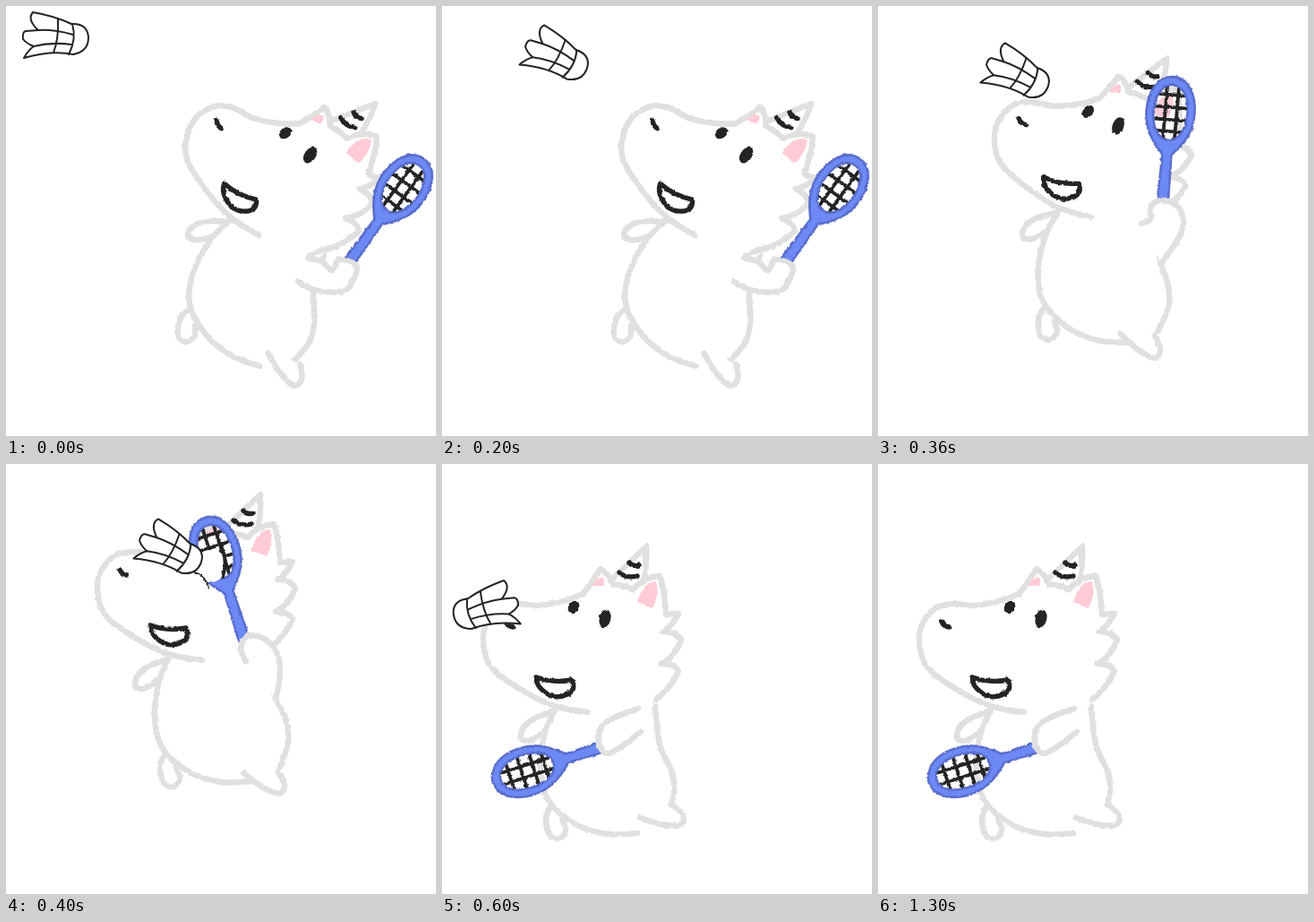
Recreate the animation shown at these times as an HTML page. Size 480 by 480 pixels, loop 1700 ms.

```html
<!DOCTYPE html>
<html lang="en">
<head>
<meta charset="utf-8">
<title>Unicorn badminton</title>
<style>
html, body { margin: 0; width: 100%; height: 100%; overflow: hidden; background: #fff; }
svg { display: block; width: 480px; height: 480px; }
path { stroke-linecap: round; stroke-linejoin: round; }
.soft { fill: #fff; stroke: #e0e0e0; stroke-width: 6.4; }
.line { fill: none; stroke: #e0e0e0; stroke-width: 6.4; }
.ink { fill: none; stroke: #242424; stroke-width: 5.4; }
.mesh { fill: none; stroke: #242424; stroke-width: 3.8; }
.dot { fill: #242424; }
.pink { fill: #ffcbd6; }
.blue { fill: #6d89f5; stroke: #5a6dcb; stroke-width: 2.6; }
.cock { fill: #fff; stroke: #242424; stroke-width: 2; }
</style>
</head>
<body>
<svg viewBox="0 0 480 480">
  <filter id="crayon" filterUnits="userSpaceOnUse" x="0" y="0" width="480" height="480" color-interpolation-filters="sRGB">
    <feTurbulence type="fractalNoise" baseFrequency=".22" numOctaves="2" seed="4"/>
    <feDisplacementMap in="SourceGraphic" scale="3" xChannelSelector="R" yChannelSelector="G"/>
  </filter>
  <g id="player" filter="url(#crayon)"></g>
  <g id="shuttle"></g>
</svg>
<script>
const player = document.getElementById('player');
const shuttle = document.getElementById('shuttle');

// Smooth open curve through "x,y x,y ..." points
function curve(text) {
  const p = text.split(' ').map(s => s.split(',').map(Number));
  let d = 'M' + p[0];
  for (let i = 0; i < p.length - 1; i++) {
    const b = p[i], c = p[i + 1], a = p[i - 1] || b, e = p[i + 2] || c;
    d += `C${[0, 1].map(k => b[k] + (c[k] - a[k]) / 6)} ${[0, 1].map(k => c[k] - (e[k] - b[k]) / 6)} ${c}`;
  }
  return d;
}
const path = (cls, d) => `<path class="${cls}" d="${d}"/>`;
const soft = text => path('soft', curve(text));
const group = (transform, inner) => `<g transform="${transform}">${inner}</g>`;
const eye = (x, y, rx, ry, turn) =>
  group(`translate(${x} ${y}) rotate(${turn})`, `<ellipse class="dot" rx="${rx}" ry="${ry}"/>`);

// One rigid body and head; only foot, arm and racket move on their own
const torso =
  soft('124,276 101,285 89,298 90,308 102,307 118,295') +
  soft('123,379 116,395 120,414 131,418 138,409 134,397') +
  soft('125,276 114,303 110,343 119,376 149,402 184,413 218,412') +
  path('line', curve('238,270 243,313 256,343 259,368 250,396'));
const foot = soft('209,403 229,418 249,426 255,416 247,401');

const snout = curve('163,277 125,270 85,250 57,229 47,208 48,182 64,161 85,156 108,158 135,153 157,145');
const mane = 'Q250 168 264 167Q256 182 247 187Q262 187 267 197Q259 216 245 223Q260 223 264 231Q257 248 239 263';
const head =
  path('soft', 'M190 128L228 92Q229 112 225 131') +
  path('soft', snout + 'Q167 133 177 117Q186 122 190 134Q203 135 213 140Q226 126 243 125Q248 137 250 168' + mane) +
  path('pink', 'M168 136Q172 127 179 126Q182 131 180 136Z') +
  path('pink', 'M218 155Q224 131 239 131Q243 146 235 161Q228 158 218 155Z') +
  path('ink', 'M209 110Q213 115 220 113M198 121Q206 128 218 125M71 176Q73 181 79 182') +
  path('ink', 'M105 238Q124 245 145 241Q150 252 140 257Q126 264 114 254Q105 247 105 238Z') +
  eye(147, 160, 5.8, 7.6, 30) + eye(182, 172.5, 6.4, 10, 14);

// Racket: head at the origin, handle along +x
const racket = len =>
  path('mesh', 'M-29-7H28M-30 6H29M-20-14V14M-6-19V19M8-19V19M21-14V14') +
  path('blue',
    `M-40 0C-40-17-22-27 0-27C20-27 34-17 47-5L${len}-6V6L47 5C34 17 20 27 0 27C-22 27-40 17-40 0Z` +
    'M-31 0C-31 13-16 19 0 19C17 19 31 12 31 0C31-12 17-19 0-19C-16-19-31-13-31 0Z');
// Strings pushed aside as the shuttle lands
const dent = '<circle cx="228" cy="114" r="18" fill="#fff"/>' +
  path('mesh', 'M242 96Q247 110 242 126') +
  path('cock', 'M211 121Q224 126 226 139');

// body: nostril x, y, turn; racket: x, y, turn, length; foot: shift, turn
const poses = [
  { body: [237, 132, 22], racket: [443, 203, 126, 100], foot: [1, 0],
    arm: '326,308 345,317 375,319 387,307 391,290 372,283 364,295 352,285 337,280 360,270' },
  { body: [160, 129, 6], racket: [326.5, 119, 95, 97], foot: [0, 0],
    arm: '294,243 304,238 305,224 315,217 333,222 341,240 335,260 316,288' },
  { body: [130, 121, 0], racket: [234, 98, 72, 103], foot: [0, 0], dent,
    arm: '267,220 262,205 270,192 288,195 303,212 306,235 301,262' },
  { body: [103, 150, 0], racket: [168, 142, 61, 101], foot: [.3, -6],
    arm: '247,268 240,255 220,240 217,230 228,223 250,230 264,243' },
  { body: [74, 179, 0], racket: [95, 343, -18, 87], foot: [1, -20],
    arm: '219,273 190,284 177,295 175,312 185,323 205,312 222,299' }
];

function drawPose({ body: [x, y, turn], racket: [rx, ry, tilt, len], foot: [kick, bend], arm, dent = '' }) {
  const step = `translate(${12 * kick} ${-8 * kick}) rotate(${bend} 209 403)`;
  return group(`translate(${x} ${y}) rotate(${turn}) translate(-74 -179)`, torso + group(step, foot) + head) +
    group(`translate(${rx} ${ry}) rotate(${tilt})`, racket(len)) + dent + soft(arm);
}

// Shuttle around its cork, feathers to the left
shuttle.innerHTML =
  path('cock', 'M-49-30Q-25-26-6-17Q12-18 13-2Q13 14-4 17Q-28 12-59 21Q-54 12-48 8Q-56 5-60 0Q-61-8-57-9L-43-10Q-56-22-49-30Z') +
  path('cock', 'M-43-10Q-26-11-4-5M-48 8Q-28 3-6 6') +
  '<path class="cock" style="fill:none" d="M-21-23Q-20 0-26 15M-5-17Q0 0-9 17"/>';

// Straight in, then mirrored and straight back out
function flight(beat) {
  if (beat === 0) return 'translate(79 37)';
  if (beat < 4) return `translate(${121 + 28 * beat} ${47 + 20 * beat}) rotate(21)`;
  return `translate(${406 - 76 * beat} ${-37 + 41 * beat}) rotate(170) scale(1 -1)`;
}

const drawings = poses.map(drawPose);
const loop = 1700, hold = 200, pace = 100, last = 6;
let shown;
function tick() {
  const t = performance.now() % loop;
  const beat = t < hold ? 0 : Math.min(last, 1 + Math.floor((t - hold) / pace));
  if (beat !== shown) {
    shown = beat;
    player.innerHTML = drawings[Math.min(4, Math.max(0, beat - 1))];
    shuttle.setAttribute('transform', flight(beat));
    shuttle.setAttribute('visibility', beat < last ? 'visible' : 'hidden');
  }
  requestAnimationFrame(tick);
}
tick();
</script>
</body>
</html>
```
